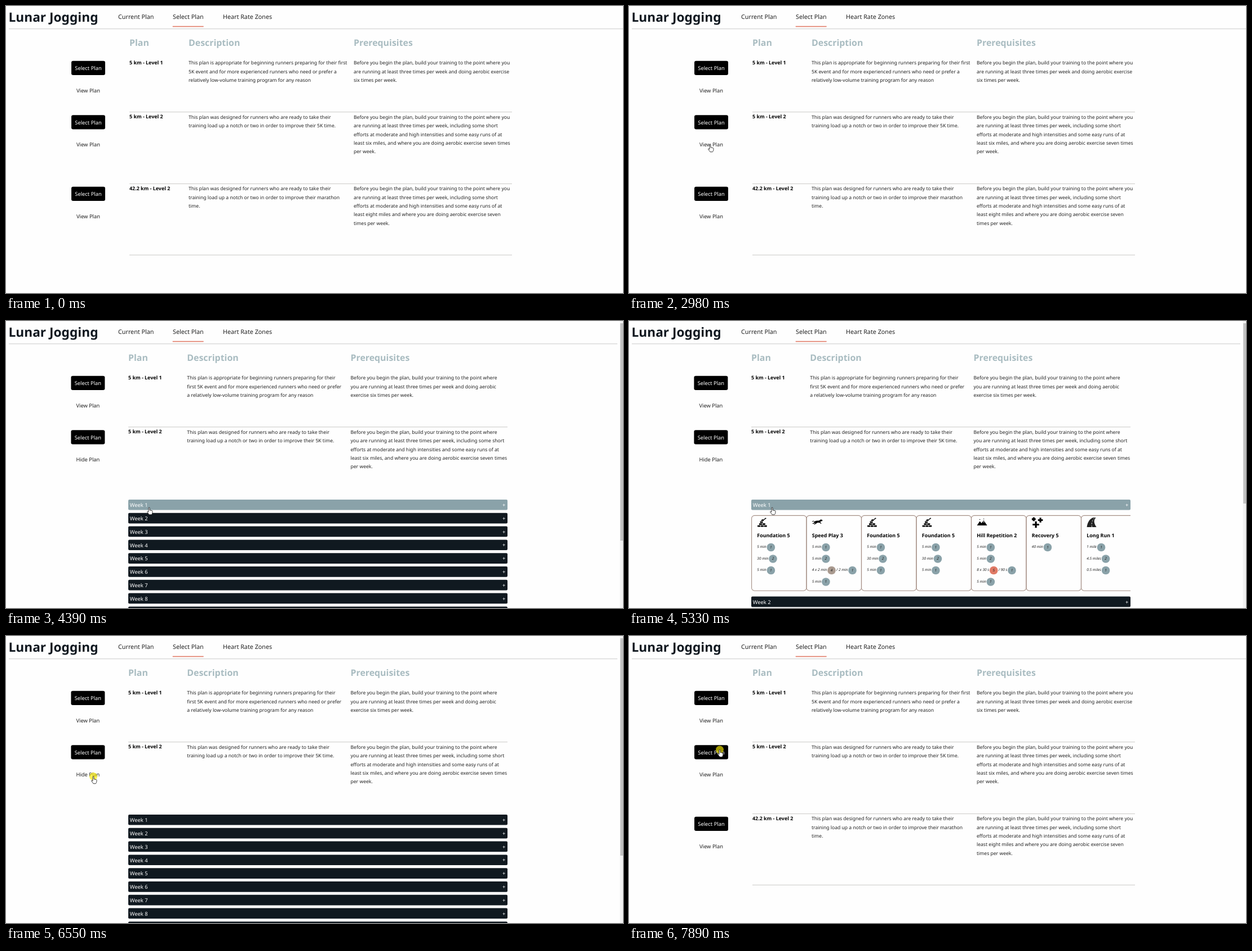
These frames come from a looping animation (1095x511 px, 8 s). An HTML page:

```html
<!DOCTYPE html>
<html lang="en">
<head>
<meta charset="utf-8">
<title>Training plans</title>
<style>
  html, body { margin: 0; width: 100%; height: 100%; overflow: hidden; background: #fefefe; }
  svg { display: block; width: 100%; height: 100%; }
  text { font: 8.59px "Noto Sans", "Open Sans", sans-serif; fill: #212121; text-rendering: geometricPrecision; white-space: pre; }
  .title { font-size: 22.7px; font-weight: 700; fill: #101820; }
  .nav { font-size: 10.75px; }
  .head { font-size: 15.9px; font-weight: 700; fill: #a9bcc1; }
  .name { font-size: 8.9px; font-weight: 700; fill: #000; }
  .link { font-size: 9.35px; }
  .light { font-size: 9.35px; fill: #fff; }
  .step { font-size: 6.5px; font-style: italic; }
  .mid { text-anchor: middle; }
</style>
</head>
<body>
<svg id="stage" viewBox="0 0 1095 511" preserveAspectRatio="none"></svg>
<script>
const LOOP = 8000, SLATE = '#8aa2a9', INK = '#101920';
const stage = document.getElementById('stage');

const text = (x, y, s, cls = '') => `<text x="${x}" y="${y}" class="${cls}">${s}</text>`;
const rect = (x, y, w, h, fill, r = 0, extra = '') =>
  `<rect x="${x}" y="${y}" width="${w}" height="${h}" rx="${r}" fill="${fill}" ${extra}/>`;
const rule = (x1, x2, y, color = '#d2d1cf', w = 1.2) => rect(x1, y - w / 2, x2 - x1, w, color);
const group = (id, body, attrs = '') => `<g id="${id}" ${attrs}>${body}</g>`;

// "|" always breaks a line, "~" only in the wide layout, "^" only in the narrow one.
const rows = [
  { y: 97.8, name: '5 km - Level 1',
    desc: 'This plan is appropriate for beginning runners preparing for their^first~5K event and for more experienced runners who need or prefer^a~relatively low-volume training program for any reason',
    pre: 'Before you begin the plan, build your training to the point where^you~are running at least three times per week and doing aerobic^exercise~six times per week.' },
  { y: 194.2, name: '5 km - Level 2',
    desc: 'This plan was designed for runners who are ready to take their|training load up a notch or two in order to improve their 5K time.',
    pre: 'Before you begin the plan, build your training to the point where^you~are running at least three times per week, including some short|efforts at moderate and high intensities and some easy runs of at|least six miles, and where you are doing aerobic exercise seven times|per week.' },
  { y: 321.7, name: '42.2 km - Level 2',
    desc: 'This plan was designed for runners who are ready to take their|training load up a notch or two in order to improve their marathon|time.',
    pre: 'Before you begin the plan, build your training to the point where you|are running at least three times per week, including some short|efforts at moderate and high intensities and some easy runs of at|least eight miles and where you are doing aerobic exercise seven|times per week.' }
];

function paragraph(x, y, s, narrow) {
  const lines = s.replace(/[~^]/g, c => (c === '^') === narrow ? '|' : ' ').split('|');
  return lines.map((line, i) => text(x, y + i * 15.45, line)).join('');
}

function table(narrow) {
  const [left, plan, desc, pre, right] = narrow ? [115.4, 217, 321.3, 611.5, 890] : [116, 219, 324, 617, 898];
  let out = rule(5, narrow ? 1085 : 1095, 40.6, '#d8d8d8', 1.4)
    + text(plan, 71, 'Plan', 'head') + text(desc, 71, 'Description', 'head') + text(pre, 71, 'Prerequisites', 'head');
  rows.slice(0, narrow ? 2 : 3).forEach((row, i) => {
    const y = row.y, open = narrow && i === 1;
    out += rect(left, y, 60, 25.2, '#000', 3)
      + text(left + 30, y + 16.4, 'Select Plan', 'light mid')
      + text(left + 30, y + 56.2, open ? 'Hide Plan' : 'View Plan', 'link mid')
      + text(plan, y + 6.2, row.name, 'name')
      + paragraph(desc, y + 6.4, row.desc, narrow)
      + paragraph(pre, y + 6.4, row.pre, narrow);
    if (!open) out += rule(plan, right, [188.7, 316.5, 443.4][i]);
  });
  return out;
}

const weekBar = (n, y, id = '') =>
  rect(217, y, 673, 18.7, INK, 2, id && `id="${id}"`) + text(219.8, y + 13.2, 'Week ' + n, 'light') + text(881, y + 13, '+', 'light');

const scrollbar = bottom => rect(1089.6, 0, 5.4, 511, '#f1f1f1') + rect(1090.2, 4, 4.8, bottom - 4, '#c1c1c1');

// Icons are drawn in a box of about 18 by 18.
const plus = (x, y, r) => `M${x - r} ${y}h${2 * r}M${x} ${y - r}v${2 * r}`;
const brick = (x, y) => `M${x} ${y}h5v2.7h-5z`;
const icons = {
  bricks: `<path d="${[[.5, 13.8], [6.3, 13.8], [12.1, 13.8], [3.4, 10.3], [9.2, 10.3], [5, 6.8]].map(p => brick(...p)).join('')}M6 5.800l3-2.800 3.500.8-1.500 2.300zM11.500 3.200l3.500-3 1.200 1.300-3.700 2.500z"/>`,
  cheetah: `<path d="M4.500 7.500Q2 5 0 7.200" fill="none" stroke="#000"/><path d="M4 7q3-1.800 8-1.400l2.500-1.800q2.200-.8 4 1.200l-.8 1.200-2.200.3-1.300 1.700 2.300 2.200-.8.7-3-2-4 .2-2.200 2-3.200 1.200-.3-.9 2.300-1.400.1-1.200-2.400 1.800-2.400.1v-1l2.200-.5z"/>`,
  hills: '<path d="M0 14L5 6.500l3 3.500 4-5 6 9zM4 4l1-1.400L6 4zM11 3l1-1.200L13 3z"/><path d="M11 7.800l1-1.400 1.200 1.600-1.200.8z" fill="#fff"/>',
  pluses: `<path d="${plus(3.2, 2.8, 3.4)}${plus(15, 4.5, 4.3)}${plus(7, 12.5, 5.8)}" fill="none" stroke="#000" stroke-width="3.2"/>`,
  road: '<path d="M0 17C1 9 4 3 11 0h5C11 5 13 11 17 17z" fill="#222"/><path d="M9 17Q7 8 13 1" fill="none" stroke="#fff" stroke-width=".8" stroke-dasharray="3 2"/>'
};

// Each step alternates a label and its zone.
const foundation = ['Foundation 5', 'bricks', '5 min,1', '30 min,2', '5 min,1'];
const cards = [
  foundation,
  ['Speed Play 3', 'cheetah', '5 min,1', '5 min,2', '4 x 2 min,4,/ 2 min,1', '5 min,1'],
  foundation,
  foundation,
  ['Hill Repetition 2', 'hills', '5 min,1', '5 min,2', '8 x 30 s,5,/ 90 s,1', '5 min,1'],
  ['Recovery 5', 'pluses', '40 min,1'],
  ['Long Run 1', 'road', '1 mile,1', '4.5 miles,2', '0.5 miles,1']
];
const zoneColor = { 4: '#a99a8f', 5: '#e07a66' };
const pen = document.createElement('canvas').getContext('2d');
pen.font = 'italic 6.5px "Noto Sans", "Open Sans", sans-serif';

function card([name, icon, ...steps], i) {
  const x = 217.6 + i * 97.5, inner = x + 9.7;
  let out = rect(x, 346.4, 97.3, 133.8, 'none', 5, 'stroke="#a58f85" stroke-width="1.1"')
    + `<g transform="translate(${inner + 0.3} 350)">${icons[icon]}</g>`
    + text(inner, 385, name, 'name');
  steps.forEach((step, n) => {
    const y = 403 + n * 20.5;
    let cursor = inner;
    step.split(',').forEach((part, k) => {
      if (k % 2) {
        out += `<circle cx="${cursor + 8.2}" cy="${y}" r="7.3" fill="${zoneColor[part] || SLATE}"/>`
          + text(cursor + 8.2, y + 1.7, part, 'step mid');
        cursor += 16.6;
      } else {
        out += text(cursor, y + 1, part, 'step');
        cursor += pen.measureText(part).width;
      }
    });
  });
  return out;
}

const weeks = Array.from({ length: 8 }, (_, i) => weekBar(i + 2, 341.8 + i * 23.8)).join('');

stage.innerHTML = '<clipPath id="cardArea"><rect x="217" y="340" width="673" height="150"/></clipPath>'
  + text(4.5, 28, 'Lunar Jogging', 'title')
  + text(199, 23, 'Current Plan', 'nav') + text(296, 23, 'Select Plan', 'nav') + text(385, 23, 'Heart Rate Zones', 'nav')
  + rule(295.7, 350.6, 36.5, '#e07a66', 1.6)
  + group('wide', table(false))
  + group('narrow', table(true) + weekBar(1, 317.9, 'firstBar')
    + group('closed', weeks + scrollbar(391))
    + group('opened', group('cards', cards.map(card).join(''), 'clip-path="url(#cardArea)"') + weekBar(2, 490.5) + scrollbar(325)))
  + group('pointer',
    '<circle id="click" r="7" fill="#f6e800" opacity=".66"/>'
    + '<path id="hand" d="M-1 1a1 1 0 0 1 2 0v3.800l4 .9q1.300.4 1.100 1.800l-.5 2.800q-.3 1.500-1.400 2.500h-4.200q-1.200-1.700-3.300-4.600-.2-1.300 1-1.200l1.300 1.200z" fill="#fff" stroke="#111" stroke-width=".8"/>'
    + '<path id="arrow" d="M0 0v10l2.300-2.200 1.500 3.500 1.500-.6-1.500-3.400h3.100z" fill="#fff" stroke="#111" stroke-width=".8"/>');

const el = id => document.getElementById(id);
const show = (id, on) => { el(id).style.display = on ? '' : 'none'; };
const within = (t, from, to) => t >= from && t < to;

// start, end, then start point, control point and end point
const moves = [
  [130, 880, 818, 372, 200, -40, 72, 132],
  [950, 1300, 72, 132, 100, 150, 141, 204.5],
  [2310, 2770, 141, 204.5, 150, 228, 144, 247],
  [3450, 3930, 144, 247, 190, 300, 253, 331],
  [4120, 4121, 253, 331, 253, 331, 254, 332],
  [5660, 6420, 254, 332, 95, 145, 155, 250],
  [6810, 7210, 155, 250, 162, 228, 161, 202.5]
];
const clicks = [[2920, 2980], [4250, 4390], [5200, 5330], [6550, 6680], [7890, LOOP]];

function pointerAt(t) {
  const [start, end, x0, y0, x1, y1, x2, y2] = moves.findLast(m => t >= m[0]) || moves[0];
  const p = Math.min(1, Math.max(0, (t - start) / (end - start))), u = p * p * (3 - 2 * p), v = 1 - u;
  const curve = (a, b, c) => a * v * v + 2 * b * u * v + c * u * u;
  return [curve(x0, x1, x2), curve(y0, y1, y2)];
}

function draw(now) {
  const t = now % LOOP;
  const narrow = within(t, 3190, 6810), opened = within(t, 4460, 5460);
  const [x, y] = pointerAt(t);
  const onBar = narrow && x > 217 && y > 317.9 && y < 336.6;
  const onLink = x > 115 && x < 176 && rows.some(r => within(y - r.y, 0, 25) || within(y - r.y, 44, 62));

  show('wide', !narrow);
  show('narrow', narrow);
  show('closed', !opened);
  show('opened', opened);
  el('firstBar').setAttribute('fill', onBar ? SLATE : INK);

  show('pointer', t >= 130);
  el('pointer').setAttribute('transform', `translate(${x} ${y})`);
  show('hand', onBar || onLink);
  show('arrow', !(onBar || onLink));
  show('click', clicks.some(c => within(t, ...c)));
  requestAnimationFrame(() => draw(performance.now() - origin));
}
const origin = performance.now();
draw(0);
</script>
</body>
</html>
```
